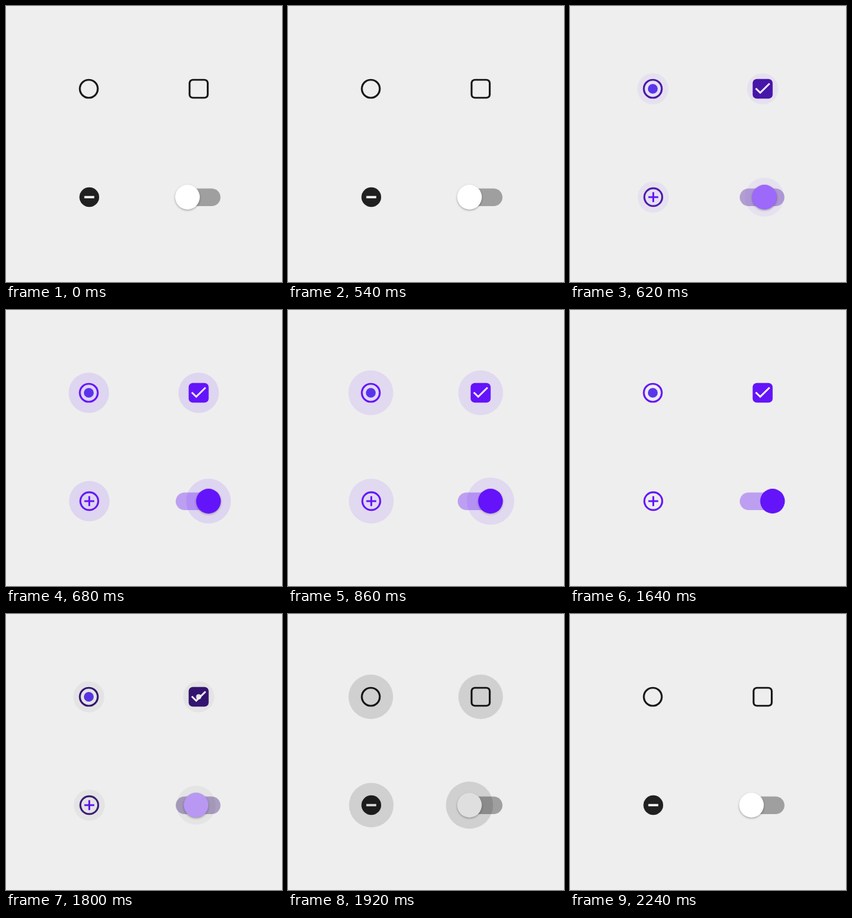
An HTML page with a canvas for the animation above (2580 ms loop, 400 px wide and 400 px high).

```html
<!DOCTYPE html>
<html lang="en">
<head>
<meta charset="utf-8">
<title>Selection controls</title>
<style>
html, body { margin: 0; width: 100%; height: 100%; overflow: hidden; background: #eee; }
canvas { display: block; width: 400px; height: 400px; }
</style>
</head>
<body>
<canvas id="stage"></canvas>
<script>
const canvas = document.getElementById('stage');
const ctx = canvas.getContext('2d');
const dpr = window.devicePixelRatio || 1;
canvas.width = canvas.height = 400 * dpr;

const LOOP = 2580;
const BG = [238, 238, 238], WHITE = [255, 255, 255], INK = [20, 22, 24];
const DISC = [32, 32, 32], PURPLE = [100, 20, 249], DOT = [91, 54, 234];
const TRACK_OFF = [159, 159, 159], TRACK_ON = [189, 159, 242];

const ramp = (x, a, b) => Math.min(1, Math.max(0, (x - a) / (b - a)));
const smooth = u => u * u * (3 - 2 * u);
const easeOut = u => 1 - (1 - u) * (1 - u);
const lerp = (a, b, u) => a + (b - a) * u;
const mix = (a, b, u) => a.map((v, i) => lerp(v, b[i], u));
const css = (c, alpha = 1) => `rgba(${c.map(Math.round).join(',')},${alpha})`;

function disc(x, y, r, color) {
  if (r <= 0) return;
  ctx.fillStyle = color;
  ctx.beginPath();
  ctx.arc(x, y, r, 0, Math.PI * 2);
  ctx.fill();
}

function ring(x, y, r, width, color) {
  ctx.strokeStyle = color;
  ctx.lineWidth = width;
  ctx.beginPath();
  ctx.arc(x, y, r, 0, Math.PI * 2);
  ctx.stroke();
}

function box(x, y, halfW, halfH, r, color) {
  if (halfW <= 0 || halfH <= 0) return;
  ctx.fillStyle = color;
  ctx.beginPath();
  ctx.roundRect(x - halfW, y - halfH, halfW * 2, halfH * 2, r);
  ctx.fill();
}

function radio(on, mark) {
  ring(120, 120, 13, 2.7, css(mix(INK, PURPLE, on)));
  disc(120, 120, 7.1 * mark, css(DOT));
}

function checkbox(on, mark) {
  const x = 279.2, y = 120;
  const hole = 11.8 * (1 - ramp(on, 0, 0.6));
  box(x, y, 14.5, 14.3, 6, css(mix(INK, PURPLE, on)));
  box(x, y, hole, hole, Math.min(hole, 3.8), css(BG));
  ctx.strokeStyle = css(WHITE, mark);
  ctx.lineWidth = 2.6;
  ctx.beginPath();
  ctx.moveTo(269.2, 119.4);
  ctx.lineTo(275.7, 125.7);
  ctx.lineTo(289.2, 112.4);
  ctx.stroke();
}

function plusMinus(on, mark) {
  const x = 120.7, y = 277;
  disc(x, y, 14.3, css(mix(DISC, PURPLE, on)));
  disc(x, y, 11.6 * mark, css(BG));
  const color = css(mix(WHITE, PURPLE, mark));
  box(x, y, 7.2, lerp(1.6, 1.3, mark), 0, color);
  if (mark > 0) box(x, y, 1.3, 7.2 * mark, 0, color);
}

function toggle(on, x, shadow) {
  box(278.4, 277.2, 32.4, 12.8, 12.8, css(mix(TRACK_OFF, TRACK_ON, on)));
  ctx.save();
  ctx.shadowColor = `rgba(0,0,0,${0.34 * shadow})`;
  ctx.shadowBlur = 3 * dpr;
  ctx.shadowOffsetY = 1.2 * dpr;
  disc(x, 277, 17.9, css(mix(WHITE, PURPLE, on)));
  ctx.restore();
}

function ripples(grow, alpha, size, color, knobX) {
  if (alpha <= 0) return;
  const fill = css(color, alpha);
  const r = lerp(12, size, easeOut(grow));
  disc(120, 120, r, fill);
  disc(279.2, 120, r, fill);
  disc(120.7, 277, r, fill);
  disc(knobX, 277, lerp(22, size + 1.8, easeOut(grow)), fill);
}

function draw(t) {
  const on = smooth(ramp(t, 540, 680)) - smooth(ramp(t, 1700, 1880));
  const mark = ramp(on, 0, 0.4);
  const knobX = lerp(263, 293.5, on);
  const shadow = 1 - ramp(t, 820, 1060) + ramp(t, 1640, 1800);

  ctx.setTransform(dpr, 0, 0, dpr, 0, 0);
  ctx.fillStyle = css(BG);
  ctx.fillRect(0, 0, 400, 400);

  radio(on, mark);
  checkbox(on, mark);
  plusMinus(on, mark);
  toggle(on, knobX, shadow);

  if (t < 1640) {
    const alpha = 0.115 * ramp(t, 560, 680) * (1 - ramp(t, 820, 1060));
    ripples(ramp(t, 560, 760), alpha, 32.5, PURPLE, knobX);
  } else {
    const alpha = 0.125 * ramp(t, 1740, 1920) * (1 - ramp(t, 1940, 2160));
    ripples(ramp(t, 1740, 1940), alpha, 32.5, [0, 0, 0], knobX);
  }
}

const start = performance.now();
function tick() {
  draw((performance.now() - start) % LOOP);
  requestAnimationFrame(tick);
}
tick();
</script>
</body>
</html>
```
